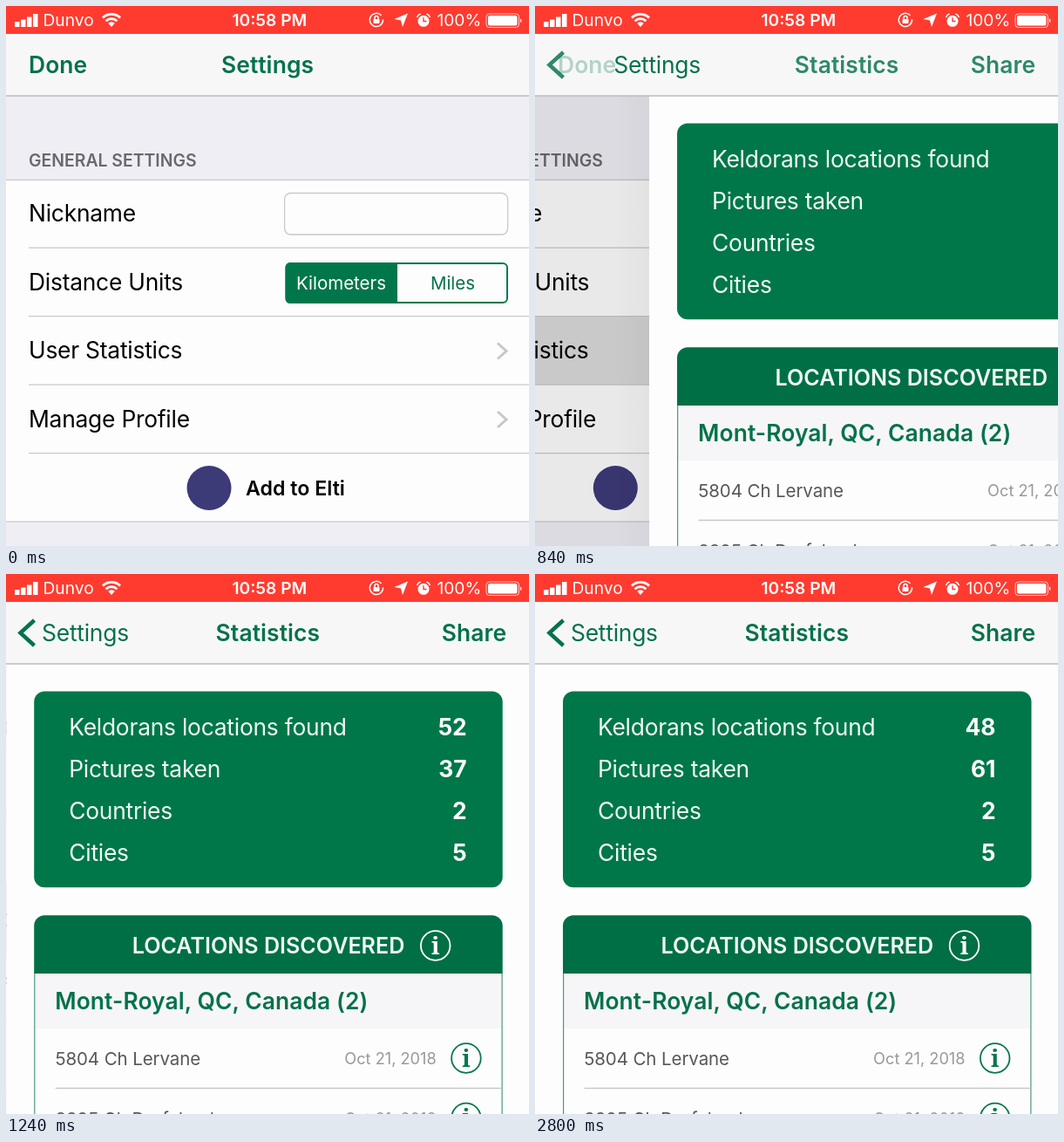
An HTML page that plays this animation: 600 by 619 pixels, repeating every 2.92 s.

```html
<!DOCTYPE html>
<html lang="en">
<head>
<meta charset="utf-8">
<title>Settings to statistics</title>
<style>
  html, body { margin: 0; width: 100%; height: 100%; overflow: hidden; background: #fff; }
  svg { display: block; width: 600px; height: 619px; }
  text {
    font: 400 26.4px Inter, "Noto Sans", sans-serif;
    font-optical-sizing: none;
    letter-spacing: -.24px;
  }
  .green { fill: #04724a; }
  .white { fill: #fff; }
  .pale { fill: #eefaf4; }
  .title { font-weight: 600; letter-spacing: .1px; }
  .number { font-weight: 700; letter-spacing: 0; text-anchor: end; }
  .mid { text-anchor: middle; }
  .end { text-anchor: end; }
  .status { font-size: 19.2px; letter-spacing: 0; }
  .section { font-size: 19.4px; font-weight: 600; letter-spacing: 0; fill: #69686e; }
  .segment { font-size: 20.5px; letter-spacing: 0; }
  .shortcut { font-size: 23.2px; font-weight: 600; letter-spacing: 0; }
  .heading { font-size: 25.1px; font-weight: 600; letter-spacing: 0; }
  .street { font-size: 20.5px; letter-spacing: -.1px; fill: #57575a; }
  .date { font-size: 18.2px; letter-spacing: 0; fill: #98989c; }
  .info { font: 700 27px "Noto Serif", serif; letter-spacing: 0; text-anchor: middle; }
  .line { fill: none; stroke: #c9c8cd; stroke-width: 1.3; }
  .arrow { fill: none; stroke: #c7c7cc; stroke-width: 3; }
</style>
</head>
<body>
<svg viewBox="0 0 600 619">
  <defs>
    <linearGradient id="shade">
      <stop offset="0" stop-color="#000" stop-opacity="0"/>
      <stop offset="1" stop-color="#000" stop-opacity=".03"/>
    </linearGradient>
    <linearGradient id="fade" gradientUnits="userSpaceOnUse" x1="465" x2="495" y1="0" y2="0">
      <stop offset="0" stop-color="#fff"/>
      <stop offset="1" stop-color="#000"/>
    </linearGradient>
    <mask id="beforeShare" maskUnits="userSpaceOnUse" x="0" y="32" width="600" height="72">
      <rect y="32" width="600" height="72" fill="url(#fade)"/>
    </mask>
    <g id="ring">
      <circle r="16.8" fill="none" stroke="currentColor" stroke-width="1.8"/>
      <text class="info" y="9.5" fill="currentColor">i</text>
    </g>
  </defs>

  <g id="settings">
    <rect y="103" width="600" height="516" fill="#efeef4"/>
    <rect y="199" width="600" height="392" fill="#fdfdfe"/>
    <rect id="pressed" y="356" width="600" height="78" fill="#dadadb"/>
    <path class="line" d="M0 199.3H600M26 277.2H600M26 355.6H600M26 434.2H600M26 512.7H600M0 591.2H600"/>
    <text class="section" x="26" y="184">GENERAL SETTINGS</text>
    <text x="26" y="247">Nickname</text>
    <text x="26" y="325.5">Distance Units</text>
    <text x="26" y="404">User Statistics</text>
    <text x="26" y="482.5">Manage Profile</text>
    <rect class="line" x="319.6" y="214.5" width="256" height="47.5" rx="7"/>
    <rect x="321.5" y="295" width="253.5" height="45" rx="5" fill="#fdfdfe" stroke="#04784b" stroke-width="2"/>
    <path d="M449 294H326a5.5 5.5 0 0 0-5.5 5.5v36a5.5 5.5 0 0 0 5.5 5.5H449z" fill="#00774a"/>
    <text class="segment white mid" x="384.5" y="325">Kilometers</text>
    <text class="segment green mid" x="512.5" y="325">Miles</text>
    <path class="arrow" d="M564 386.5l10 9-10 9M564 465l10 9-10 9"/>
    <circle cx="233" cy="552.5" r="25.5" fill="#3d3a78"/>
    <text class="shortcut" x="275" y="561">Add to Elti</text>
  </g>
  <rect id="dim" y="103" width="600" height="516" opacity="0"/>

  <g id="panel" transform="translate(600)">
    <rect id="edge" x="-40" y="103" width="40" height="516" fill="url(#shade)"/>
    <rect y="103" width="600" height="516" fill="#fefdfe"/>
    <rect x="32" y="134.6" width="537.5" height="224.6" rx="12" fill="#007749"/>
    <g class="pale">
      <text x="72" y="184.5">Keldorans locations found</text>
      <text x="72" y="232.5">Pictures taken</text>
      <text x="72" y="280.5">Countries</text>
      <text x="72" y="328.5">Cities</text>
    </g>
    <g class="white">
      <text class="number" id="places" x="528.5" y="184.5">48</text>
      <text class="number" id="pictures" x="528.5" y="232.5">61</text>
      <text class="number" x="528.5" y="280.5">2</text>
      <text class="number" x="528.5" y="328.5">5</text>
    </g>
    <path d="M32 458V403.2a12 12 0 0 1 12-12H557.5a12 12 0 0 1 12 12V458z" fill="#006f46"/>
    <text class="heading pale mid" x="300.8" y="434.8">LOCATIONS DISCOVERED</text>
    <use href="#ring" x="492.5" y="426" color="#fff"/>
    <rect x="33" y="458" width="535.5" height="63" fill="#f6f6f8"/>
    <path d="M32.6 458V619M568.9 458V619" stroke="#4a9b7b" stroke-width="1.2"/>
    <text class="title green" x="56" y="498.5">Mont-Royal, QC, Canada (2)</text>
    <path class="line" d="M56.5 589.5H568.5"/>
    <text class="street" x="56.2" y="563">5804 Ch Lervane</text>
    <text class="date end" x="493.5" y="562">Oct 21, 2018</text>
    <use href="#ring" x="527.7" y="555" color="#04784b"/>
    <text class="street" x="56.2" y="631.5">3395 Ch Dorfeland</text>
    <text class="date end" x="493.5" y="630.5">Oct 21, 2018</text>
    <use href="#ring" x="527.7" y="623.5" color="#04784b"/>
  </g>

  <rect y="32" width="600" height="71" fill="#f7f7f8"/>
  <path d="M0 103H600" stroke="#bdbcc0" stroke-width="1.4"/>
  <g class="green">
    <text class="title" id="done" x="26" y="77">Done</text>
    <path id="back" d="M32.5 53L16.5 67.5 32.5 82" fill="none" stroke="#04724a" stroke-width="4.5"/>
    <text class="title" id="oldTitle" y="77">Settings</text>
    <text id="backLabel" y="77">Settings</text>
    <g mask="url(#beforeShare)"><text class="title" id="newTitle" y="77">Statistics</text></g>
    <text class="title end" id="share" x="574.3" y="77">Share</text>
  </g>

  <rect width="600" height="32" fill="#ff3b30"/>
  <g class="white">
    <path d="M10 18h5.5v6H10zM17 15.5h5.5v8.500H17zM24 12.5h5.5v11.5H24zM31 9h5.5v15H31z"/>
    <text class="status" x="42.500" y="23">Dunvo</text>
    <text class="status mid" x="302.300" y="23" style="font-weight:600">10:58 PM</text>
    <text class="status end" x="545.300" y="23">100%</text>
    <path d="M121 24l-3.800-4.200a5.500 5.500 0 0 1 7.600 0z"/>
    <path d="M461 8.500l-6 15.500-2-7.500-7.500-1.500z"/>
    <circle cx="479" cy="17.300" r="6.500"/>
    <rect x="553" y="11" width="33.500" height="11.500" rx="2"/>
    <path d="M590 14.300q3 2.500 0 5z"/>
  </g>
  <g fill="none" stroke="#fff">
    <path d="M114.600 17.300a9.200 9.200 0 0 1 12.800 0M111 13.400a14.300 14.300 0 0 1 20 0" stroke-width="2.800"/>
    <path d="M430.500 10.800a7.600 7.600 0 1 0 2 4.500M423 15.500v-2a2 2 0 0 1 4 0v2" stroke-width="1.500"/>
    <path d="M471.500 13q1-3 4-4M486.500 13q-1-3-4-4" stroke-width="1.600"/>
    <path d="M479 13.300v4.200h3.500" stroke="#ff3b30" stroke-width="1.400"/>
    <rect x="551" y="9" width="37.500" height="15.500" rx="3.500" stroke-opacity=".75"/>
  </g>
  <rect x="421.500" y="15" width="7" height="5" rx="1" fill="#fff"/>
</svg>
<script>
  const LOOP = 2920, STEP = 40;
  const PRESS = 680, PUSH = 687, STIFFNESS = .0188;
  // [time, pictures counted so far]
  const COUNT = [[680, 17], [920, 26.2], [1080, 32.4], [1560, 48.3], [1800, 53.7],
                 [2040, 57.2], [2160, 58], [2260, 59], [2400, 60], [2800, 61]];
  const part = id => document.getElementById(id);
  const clamp = v => Math.max(0, Math.min(1, v));
  const opacity = (id, v) => part(id).setAttribute('opacity', clamp(v));
  const left = (id, x) => part(id).setAttribute('x', x);
  const shift = (id, x) => part(id).setAttribute('transform', `translate(${x})`);

  // Critically damped spring: distance left, from 1 down to 0.
  function remaining(t) {
    const u = Math.max(0, t - PUSH) * STIFFNESS;
    return (1 + u) * Math.exp(-u);
  }

  function counted(t) {
    const i = COUNT.findIndex(([time]) => time > t);
    if (i < 0) return COUNT[COUNT.length - 1][1];
    if (i === 0) return COUNT[0][1];
    const [t0, a] = COUNT[i - 1], [t1, b] = COUNT[i];
    return a + (b - a) * (t - t0) / (t1 - t0);
  }

  function draw(t) {
    const r = remaining(t);
    shift('panel', 600 * r);
    shift('settings', -180 * (1 - r));
    opacity('dim', .1 * (1 - r));
    opacity('edge', (1 - r) * 3);
    opacity('pressed', t >= PRESS ? 1 : 0);

    // The bar trails the pages slightly at the start.
    const bar = r + .55 * r * r * (1 - r);
    const morph = clamp((bar - .3) / .2);
    left('oldTitle', 41 + 206 * bar);
    left('backLabel', 41 + 206 * bar);
    left('newTitle', 240.5 + 240 * bar);
    opacity('oldTitle', morph);
    opacity('backLabel', 1 - morph);
    opacity('done', bar * 1.3 - .04);
    for (const id of ['back', 'newTitle', 'share']) opacity(id, (1 - bar) * 1.08);

    const done = counted(t);
    part('pictures').textContent = Math.floor(done);
    part('places').textContent = 48 + Math.ceil((61 - done) * 8 / 61);
  }

  const start = performance.now();
  function tick() {
    const t = (performance.now() - start) % LOOP;
    draw(Math.floor(t / STEP) * STEP);
    requestAnimationFrame(tick);
  }
  tick();
</script>
</body>
</html>
```
